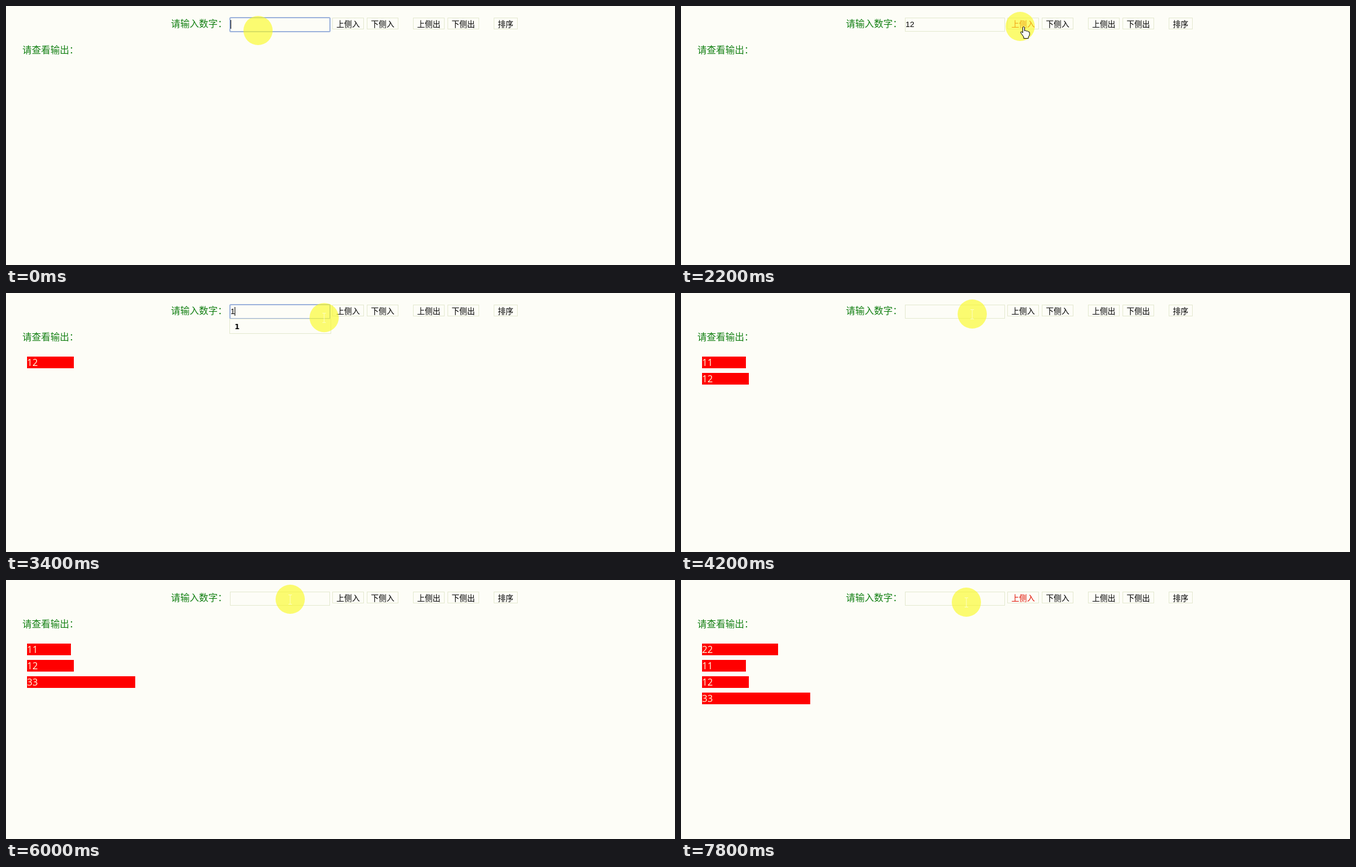
An HTML page that plays this animation: 1144 by 444 pixels, repeating every 8 s.

```html
<!DOCTYPE html>
<html lang="zh">
<meta charset="utf-8">
<style>
  html, body { margin: 0; width: 100%; height: 100%; overflow: hidden; background: #fdfdf7; }
  svg { display: block; font: 16px "Open Sans", sans-serif; }
  .label { fill: #148014; font-family: "Noto Sans CJK TC", "Noto Sans CJK SC", sans-serif; }
  .button { font: 13.33px "Noto Sans CJK SC", sans-serif; }
  .box { fill: #fdfdf7; stroke: #e4e9d0; }
  #value { font: 13.33px "Liberation Sans", Arial, sans-serif; }
  #hint text { font: bold 12px "DejaVu Sans", sans-serif; }
</style>
<svg width="1144" height="444" viewBox="0 0 1144 444">
  <text class="label" x="282" y="36">请输入数字：</text>
  <text class="label" x="28" y="81">请查看输出：</text>
  <rect class="box" x="383.5" y="20.5" width="170" height="23"/>
  <rect id="ring" x="383" y="20" width="171" height="24" rx="1.5" fill="none" stroke="#9db3dc" stroke-width="2"/>
  <text id="value" x="384" y="36"></text>
  <path id="caret" stroke="#000"/>
  <g id="hint">
    <rect class="box" x="382.5" y="44.5" width="173" height="25"/>
    <text x="391" y="62">1</text>
  </g>
  <g id="buttons"></g>
  <g id="rows"></g>
  <g id="pointer">
    <circle r="25" fill="#fafa1e" fill-opacity=".62"/>
    <path id="beam" d="M-3-7.500h6M0-7V8M-3 8.500h6" fill="none" stroke="#ffffd8" stroke-opacity=".8"/>
    <path id="hand" fill="#fdfdf7" stroke="#000" stroke-linejoin="round"
      d="M4.5 1.5q1.5-2 3 0v6q2-1.5 3 .5 2-1 3 1 2.500-.5 2.500 2v4l-2 3v2.500h-8v-2.500l-5-7q-.5-2.500 1.500-2l2 2z"/>
  </g>
</svg>
<script>
const STEP = 200, LOOP = 8000;
const $ = id => document.getElementById(id);
const mix = (a, b, f) => a + (b - a) * f;
const smooth = f => (f = Math.min(1, Math.max(0, f)), f * f * (3 - 2 * f));

// Each round: rest at (x, y), type the value, then click "push front" (0) or "push back" (1).
const rounds = [
  { x: 431, y: 42, value: "12", button: 0 },
  { x: 479, y: 35, value: "11", button: 0 },
  { x: 498, y: 36, value: "33", button: 1 },
  { x: 486, y: 33, value: "22", button: 0 },
  { x: 488, y: 38, value: "", button: 0, glow: true }
];
const FIRST = 12, REST = 9; // round lengths in steps

const show = (id, on) => $(id).setAttribute("visibility", on ? "visible" : "hidden");

let left = 558;
$("buttons").innerHTML = ["上侧入", "下侧入", "上侧出", "下侧出", "排序"].map((name, i) => {
  const x = left, w = 14 + 13.33 * name.length;
  left += w + (i % 2 ? 25 : 5);
  return `<rect class="box" x="${Math.round(x) + .5}" y="20.5" width="${Math.round(w) - 1}" height="19"/>
    <text class="button" x="${x + w / 2}" y="36" text-anchor="middle">${name}</text>`;
}).join("");
const names = document.querySelectorAll(".button");

function draw(step) {
  const index = step < FIRST ? 0 : 1 + Math.floor((step - FIRST) / REST);
  const u = index ? (step - FIRST) % REST / REST : step / FIRST;
  const round = rounds[index];

  const typed = u > .85 || u >= .64 ? 2 : u >= .4 ? 1 : 0;
  const value = round.value.slice(0, typed);
  const focused = u < .85 && (u > .3 || !index);
  $("value").textContent = value;
  $("caret").setAttribute("d", `M${384.5 + 7 * value.length} 24v15`);
  show("caret", focused);
  show("ring", focused);
  show("hint", focused && value === "1");

  const move = smooth((u - .46) / .16);
  const x = mix(round.x, 580 + 59 * round.button, move);
  const y = mix(round.y, 35, move) + 8 * Math.sin(Math.PI * move);
  const over = x > 565;
  $("pointer").setAttribute("transform", `translate(${x} ${y})`);
  show("hand", over);
  show("beam", !over && step > 0);
  names.forEach((name, i) =>
    name.setAttribute("fill", i === round.button && (over || round.glow) ? "#e01000" : "#000"));

  const queue = [];
  for (const done of rounds.slice(0, index)) queue[done.button ? "push" : "unshift"](done.value);
  $("rows").innerHTML = queue.map((n, i) =>
    `<rect x="36" y="${109 + 28 * i}" width="${20 + 5 * n}" height="20" fill="red"/>
     <text x="36" y="${125 + 28 * i}" fill="#ffffe0">${n}</text>`).join("");
}

let last = -1;
function tick() {
  const step = Math.floor(performance.now() % LOOP / STEP);
  if (step !== last) draw(last = step);
  requestAnimationFrame(tick);
}
tick();
</script>
</html>
```
